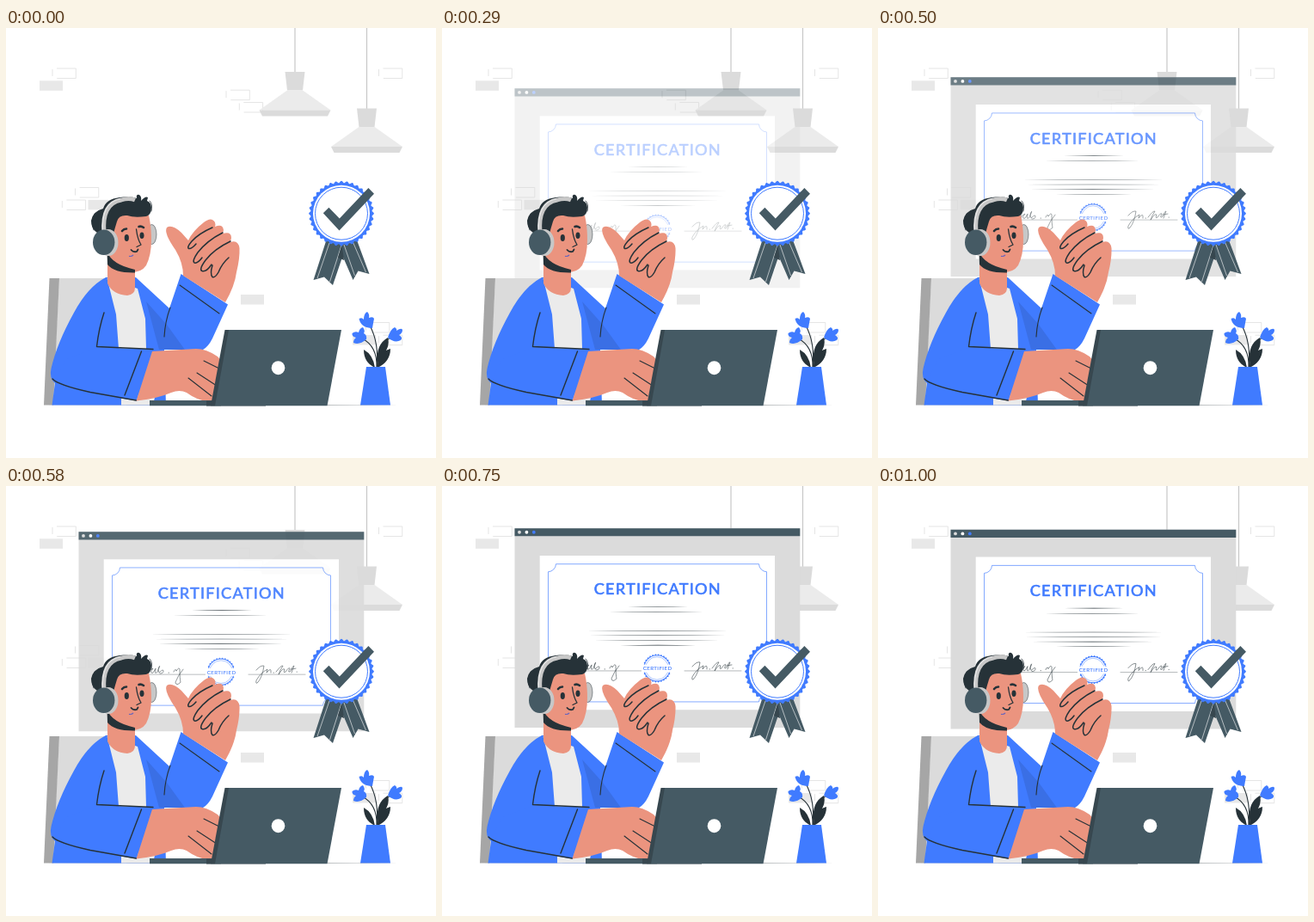
These frames come from a looping animation (500 by 500 pixels, 1.04 s). An HTML page:

```html
<!DOCTYPE html>
<html lang="en">
<head>
<meta charset="utf-8">
<title>Certification</title>
<style>
  html, body { margin: 0; width: 100%; height: 100%; overflow: hidden; background: #fff; }
  svg { display: block; width: 100vw; height: 100vh; }
  text { font-family: Lato, "Open Sans", sans-serif; fill: #407bff; stroke: #407bff; stroke-linejoin: round; }
  .blue { fill: #407bff; }
  .dark { fill: #263238; }
  .slate { fill: #455a64; }
  .skin { fill: #eb947f; }
  .ink { fill: none; stroke: #263238; stroke-linecap: round; stroke-linejoin: round; }
  .thin { fill: none; stroke: #407bff; }
</style>
</head>
<body>
<svg viewBox="0 0 500 500">
  <defs>
    <g id="lamp">
      <path d="M324.5 51H347.5L345 72.5H327Z" fill="#dbdbdb"/>
      <path d="M327 72.5H345L377.5 95.5H294.5Z" fill="#ebebeb"/>
      <path d="M294.5 95.5H377.5L374 102.5H298Z" fill="#dbdbdb"/>
    </g>
  </defs>

  <g id="bricks"></g>

  <g id="lamps">
    <path d="M336 0V51M419.5 0V94" stroke="#c7c7c7" stroke-width="1.2"/>
    <use href="#lamp"/>
    <use href="#lamp" x="83.5" y="42.5"/>
  </g>

  <g id="panel" opacity="0">
    <path d="M84.5 51.2H416.3V283H84.5Z" fill="#dbdbdb"/>
    <path class="slate" d="M84.5 51.2H416.3V60.3H84.5Z"/>
    <circle cx="90" cy="55.8" r="1.9" fill="#dbdbdb"/>
    <circle cx="98.4" cy="55.8" r="1.9" fill="#fff"/>
    <circle cx="106.8" cy="55.8" r="1.9" class="blue"/>
    <path d="M113.7 83H387V262.3H113.7Z" fill="#fff"/>
    <path class="thin" stroke-width=".65" d="M132.5 92.8H368.5A9.3 9.3 0 0 0 377.5 101.8V244A9.3 9.3 0 0 0 368.5 253H132.5A9.3 9.3 0 0 0 123.5 244V101.8A9.3 9.3 0 0 0 132.5 92.8Z"/>
    <text x="176.7" y="128.4" font-size="18.2" letter-spacing="1.22" stroke-width=".65">CERTIFICATION</text>
    <g id="rules" class="dark"></g>
    <g class="ink" stroke-width=".55">
      <path d="M160 217H235M282 217H348" stroke-width=".35"/>
      <path d="M161 217Q165 207 166 209T165 217Q167 211 171 210Q166 216 171 215L174 210Q172 218 176 214Q180 205 178 208T178 215Q183 210 183 213T179 216M189 215h.6M195 214Q197 209 198 213Q201 208 202 211Q202 222 203 226Q198 231 197 226Q200 218 206 211"/>
      <path d="M291 212Q296 206 300 207Q298 220 293 226Q290 229 291 224Q296 215 304 211L303 215Q307 210 308 212V215M311 215h.6M314 214Q320 206 322 207Q318 213 317 217Q322 209 324 211Q322 216 325 214Q329 208 330 210Q327 216 331 213Q334 206 335 207L332 215M331 211L337 210M338 214h.5"/>
    </g>
    <path id="seal" class="blue"/>
    <circle cx="250" cy="214" r="14.6" fill="#fff"/>
    <circle cx="250" cy="214" r="13.3" class="thin" stroke-width=".45"/>
    <path d="M232 209.8H268.5V218.6H232Z" fill="#fff"/>
    <text x="233.8" y="216.5" font-size="6.1" letter-spacing=".42" stroke-width=".12">CERTIFIED</text>
  </g>

  <g id="medal">
    <path class="slate" d="M384 248L403.5 293L409.5 282.5L422.5 286L407 244Z"/>
    <path class="slate" d="M373 245L357.5 293L370 289.5L380 299L397 249Z"/>
    <path d="M376 250L362 291M390 253L376.5 295M393 252L405.5 288M403 248L418.5 284" stroke="#fff" stroke-width=".6" fill="none"/>
    <path d="M390.5 252L386 267L393 270Z" fill="#37474f"/>
    <path id="rosette" class="blue"/>
    <circle cx="390" cy="215.7" r="33" fill="#fff"/>
    <circle cx="390" cy="215.7" r="30.5" class="thin" stroke-width="1"/>
    <path class="slate" d="M368.8 215.2L375.4 208.8L387.8 221.6L421.4 186L428 192.7L387.5 235.6Z"/>
  </g>

  <g id="plant">
    <path class="ink" stroke-width="1.1" d="M431 395Q434 366 423 346M431 395Q432 370 414 361M432 395Q432 367 449 359"/>
    <path class="dark" d="M429 395Q416 389 416 374Q427 380 429 395ZM432 395Q432 377 447 373Q447 388 432 395ZM432 388Q430 368 444 360Q448 372 432 388Z"/>
    <path class="blue" d="M426 349Q413 349 410.5 338Q414 336 416 339Q416 332 420 330Q423 333 422 337Q427 335 428 338Q427 343 426 349ZM419 362Q411 369 404 366Q404 362 407 360Q402 359 402.5 355Q406 352 410 354Q411 349 415 348Q418 352 416 355Q420 357 419 362ZM444 360Q447 350 452 348Q455 350 454 352Q460 348 461 351Q461 355 457 357Q462 360 459 363Q452 367 444 360Z"/>
    <path class="blue" d="M419 394H441L447 438.5H412Z"/>
  </g>

  <path d="M44 438.5Q252 437.8 459 438.5Q252 439.2 44 438.5Z" class="dark"/>
  <path d="M62 291H140V438.5H54Z" fill="#dbdbdb"/>
  <path d="M50.5 291H62L55 438.5H44Z" fill="#a6a6a6"/>

  <g id="torso">
    <path class="blue" d="M116 290Q95 301 79 331Q59 367 52.5 396Q50 407 57 413L53.5 438.5H186L184 374H229Q235 371 240 361L258 321.5L203.5 286L190 326L151 290Z"/>
    <path d="M163 318L187 345L208 374H178Z" fill="#000" opacity=".1"/>
    <path d="M117.5 291L128 333L131 373H163L162 338L153 303Z" fill="#ebebeb"/>
    <path d="M134 425H174L171 438.5H134Z" fill="#ebebeb"/>
    <path class="blue" d="M106 371L170 374L152 433.5L110 427L56 412L70 385Z"/>
    <path class="ink" stroke-width="1.4" d="M114 331Q108 349 105.5 370.5L171 373.5M157.5 376L138 427M54 408Q60 415 98 423.5L151.5 433"/>
    <path class="ink" stroke-width="1.1" d="M202 299L248 332M184 359Q185 341 191 325"/>
  </g>

  <g id="head">
    <ellipse cx="169.5" cy="240" rx="5.5" ry="11.5" fill="#c7c7c7" stroke="#263238" stroke-width=".5"/>
    <path class="skin" d="M118 262V297Q124 310 141 311Q150 310 150 302V278Z"/>
    <path class="skin" d="M116 222Q140 207 166 218Q169 231 169 246Q169 264 163 276Q157 285 143 284Q126 282 118 268Z"/>
    <path class="dark" d="M117.5 260Q123 275 150 281V284.5Q126 285 118 275Z"/>
    <path class="dark" d="M117 242Q99 239 99 224Q101 213 113 210Q116 199 132 197Q145 195 152 198Q151 193 155 194Q158 196 157 201Q162 195 165 197L164 201Q169 203 169 209Q169 217 163 219Q149 221 141 218Q131 217 129 225Q126 234 124 244Z"/>
    <path class="ink" stroke-width=".8" d="M167 201Q171 205 169 213M103 216Q98 225 102 235"/>
    <path d="M114 238Q111 204 134 200Q143 197 150 200" fill="none" stroke="#c7c7c7" stroke-width="5"/>
    <path d="M112.5 238Q110 203 133 198.5" fill="none" stroke="#ebebeb" stroke-width="1.2"/>
    <ellipse cx="119" cy="249.5" rx="11.5" ry="15.5" fill="#c7c7c7"/>
    <ellipse cx="113.7" cy="249.2" rx="12.7" ry="14.8" class="slate"/>
    <ellipse cx="140.3" cy="244" rx="2.6" ry="4" class="dark"/>
    <ellipse cx="158" cy="241.3" rx="2.5" ry="3.8" class="dark"/>
    <path class="ink" stroke-width="2.6" d="M135 236Q137 233.5 140 233.5M154.5 231Q157 230 160 232"/>
    <path class="ink" stroke-width="1.3" d="M151.5 234Q153 246 157 252L152 254.5"/>
    <path class="ink" stroke-width="1.8" d="M145.5 258Q148 261 152 260L153.5 257.5"/>
    <path d="M143 265.3Q146 266 148 264" fill="none" stroke="#6665c0" stroke-width="1.2"/>
  </g>

  <g id="thumb">
    <path class="skin" d="M206 288Q206 273 197 258Q183 238 187 232Q193 228 204 238L212 247Q217 236 230 226Q239 219 243 226Q244 229 243 231Q252 227 253 235L252 239Q262 236 262 244L261 249Q270 246 271.5 256Q272 268 268 284Q266 300 255 319Z"/>
    <path class="ink" stroke-width="1.5" d="M240 232Q224 239 216 248Q210 255 212.500 256.500Q216 257 221 251M252 238Q234 247 223 261Q216 271 219 273Q223 274 228 267M261 248Q242 257 232 270Q224 281 228 282.500Q233 284 239 275M259 267Q251 274 247 284Q243 291 240 289.500Q237 286 240 276"/>
  </g>

  <g id="laptop">
    <path class="skin" d="M170 376L221 373Q233 373 246 382L254 391L242 436L233 434Q221 432 210 424Q202 420 192 424Q176 431 151.5 433.5Z"/>
    <path class="ink" stroke-width="1.1" d="M230 387L250 397M222 401L245 416M212 407L239 428"/>
    <path class="slate" d="M167 433H243V439.3H167Z"/>
    <path d="M233 433.5H302V439.5H233Z" fill="#37474f"/>
    <path d="M254.5 351H265L250 439.3H238Z" fill="#37474f"/>
    <path class="slate" d="M259 351H390L373.5 439.3H243Z"/>
    <ellipse cx="316.5" cy="395.2" rx="7.8" ry="8" fill="#fff"/>
  </g>
</svg>

<script>
const $ = id => document.getElementById(id);
const LOOP = 1040, FPS = 24, RISE = 30, PHASE = .5, REST = -.4;

// Scalloped disc outline
function scallop(cx, cy, r, depth, bumps) {
  const points = [];
  for (let i = 0; i < bumps * 10; i++) {
    const a = i / (bumps * 10) * Math.PI * 2;
    const d = r + depth * Math.cos(a * bumps);
    points.push((cx + d * Math.cos(a)).toFixed(2) + " " + (cy + d * Math.sin(a)).toFixed(2));
  }
  return "M" + points.join("L") + "Z";
}
$("rosette").setAttribute("d", scallop(390, 215.7, 36.8, 1.1, 36));
$("seal").setAttribute("d", scallop(250, 214, 16, .6, 30));

const hollow = [[54, 47], [256, 72.2], [271.3, 86.5], [433.5, 47], [80.5, 185.5], [65.3, 200], [418.5, 342.5], [433.5, 357.2]];
const solid = [[39, 61.3], [95.5, 199.8], [273, 310], [403, 357]];
$("bricks").innerHTML =
  hollow.map(([x, y]) => `<path d="M${x + 5} ${y}h22.3v11.5h-22M${x} ${y + 9}v-8" fill="none" stroke="#e3e3e3" stroke-width=".9"/>`).join("") +
  solid.map(([x, y]) => `<rect x="${x}" y="${y}" width="27" height="11.5" fill="#e8e8e8"/>`).join("");

// Ruled lines taper towards both ends: left, right, y
const rules = [[216, 286, 142.5], [194, 304, 148.6], [168, 333, 170.3], [171, 330, 175.9], [177, 322, 181.5], [207, 295, 187.2]];
$("rules").innerHTML = rules.map(([a, b, y]) =>
  `<path d="M${a} ${y}Q${(a + b) / 2} ${y - .55} ${b} ${y}Q${(a + b) / 2} ${y + .55} ${a} ${y}Z"/>`).join("");

// cubic-bezier(.36, -.01, .5, 1.38)
function ease(x) {
  const curve = (s, a, b) => 3 * (1 - s) ** 2 * s * a + 3 * (1 - s) * s * s * b + s ** 3;
  let lo = 0, hi = 1;
  for (let i = 0; i < 30; i++) {
    const mid = (lo + hi) / 2;
    if (curve(mid, .36, .5) < x) lo = mid; else hi = mid;
  }
  return curve(lo, -.01, 1.38);
}

const stepStart = n => Math.round(n * 100 / FPS) * 10;

function draw(now) {
  const t = now % LOOP;
  let n = 0;
  while (n < FPS && stepStart(n + 1) <= t) n++;
  const p = n < 3 ? 0 : ease(Math.min(1, (n + PHASE) / FPS));
  $("panel").setAttribute("transform", `translate(0 ${RISE * (1 - p) + REST})`);
  $("panel").setAttribute("opacity", Math.max(0, Math.min(1, p)));
}

const start = performance.now();
function tick() {
  draw(performance.now() - start);
  requestAnimationFrame(tick);
}
tick();
</script>
</body>
</html>
```
